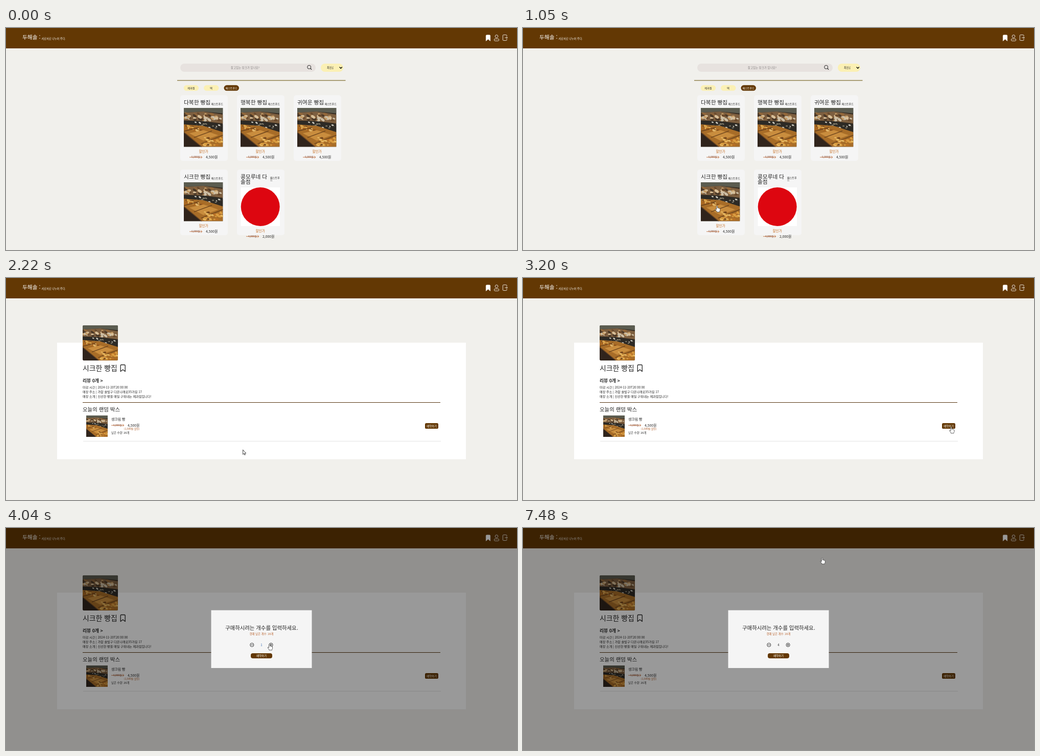
These frames come from a looping animation (1000x436 px, 8000 ms). An HTML page:

```html
<!DOCTYPE html>
<html lang="ko">
<head>
<meta charset="utf-8">
<title>빵집 예약</title>
<style>
  html, body { margin: 0; width: 100%; height: 100%; overflow: hidden; background: #f1f0ec; }
  svg { display: block; width: 100%; height: 100%; }
  text { font-family: "Noto Sans CJK KR", "Noto Sans CJK", "Noto Sans", sans-serif; }
</style>
</head>
<body>
<svg id="stage" viewBox="0 0 1000 436" xmlns="http://www.w3.org/2000/svg"></svg>
<script>
const LOOP = 8000;
const BROWN = '#633804', INK = '#242424', CREAM = '#fbf0b4', RUST = '#b9602a';

// y is the vertical middle of the line
const text = (x, y, size, str, { fill = INK, weight = 400, anchor = 'start', more = '' } = {}) =>
  `<text x="${x}" y="${y + size * 0.37}" font-size="${size}" fill="${fill}" font-weight="${weight}" text-anchor="${anchor}" ${more}>${str}</text>`;
const mid = (x, y, size, str, opts = {}) => text(x, y, size, str, { ...opts, anchor: 'middle' });
const rect = (x, y, w, h, fill, r = 0, more = '') =>
  `<rect x="${x}" y="${y}" width="${w}" height="${h}" rx="${r}" fill="${fill}" ${more}/>`;
const line = (x1, x2, y, color, width) =>
  `<path d="M${x1} ${y}H${x2}" stroke="${color}" stroke-width="${width}"/>`;
const stroke = (d, color, width, more = '') =>
  `<path d="${d}" fill="none" stroke="${color}" stroke-width="${width}" stroke-linecap="round" stroke-linejoin="round" ${more}/>`;
const photo = (x, y, size) =>
  `<use href="#photo" x="${x}" y="${y}" width="${size}" height="${size}"/>`;
const button = (x, y, w, h, label, r = 2.6) =>
  rect(x, y, w, h, BROWN, r) + mid(x + w / 2, y + h / 2, 5.5, label, { fill: '#fff', weight: 500 });

function seeded(seed) {
  return () => (seed = (seed * 16807) % 2147483647) / 2147483647;
}

function loaves(count, seed, x, y, w, h, size, colors, slope = 0) {
  const rnd = seeded(seed);
  let out = '';
  for (let i = 0; i < count; i++) {
    const across = rnd() * w, cx = x + across, cy = y + rnd() * h + across * slope;
    const r = size * (0.7 + rnd() * 0.6);
    const fill = colors[Math.floor(rnd() * colors.length)];
    out += `<ellipse cx="${cx}" cy="${cy}" rx="${r}" ry="${r * 0.55}" fill="${fill}" transform="rotate(${rnd() * 50 - 10} ${cx} ${cy})"/>`;
  }
  return out;
}

function photoSymbol() {
  return `<symbol id="photo" viewBox="0 0 100 100">
    ${rect(0, 0, 100, 100, '#33291f')}
    <path d="M0 0H100V14L50 9L0 12Z" fill="#5b5c50"/>
    <path d="M0 12L50 9L100 17V40L50 34L0 32Z" fill="#7d5f40"/>
    ${loaves(44, 77, 1, 12, 97, 17, 5, ['#c39a64', '#d8bf98', '#94683a', '#cdbfa6', '#6b4a2c', '#4a3827'], 0.06)}
    <path d="M0 33L50 34L100 42V62L50 46L0 42Z" fill="#2d2a25"/>
    ${loaves(16, 31, 30, 36, 68, 11, 3, ['#cfccc0', '#7d7868', '#454038'], 0.12)}
    <path d="M0 42L50 46L100 62V100H46L0 62Z" fill="#a86d28"/>
    ${loaves(26, 53, 3, 45, 50, 12, 4.5, ['#d9a24a', '#a9651f', '#e0b468', '#7b4a1c'], 0.15)}
    <path d="M14 65L50 57L88 70L50 84Z" fill="#c98d3e"/>
    <path d="M0 60L38 50M26 76L72 59M44 92L100 70" stroke="#6b431c" stroke-width="2"/>
    ${loaves(34, 91, 53, 76, 45, 20, 4, ['#d99c40', '#b97026', '#e6b862', '#74461c'])}
    <path d="M0 62L46 100H0Z" fill="#30241c"/>
    <path d="M0 62L46 100" stroke="#6d4724" stroke-width="2"/>
  </symbol>`;
}

const oldPrice = (x, y, label) =>
  text(x + 4, y, 4.9, label, { fill: '#7d4632' }) +
  line(x, x + 25, y + 0.3, RUST, 0.8) +
  stroke(`M${x + 22.5} ${y - 1.8}l2.3 2.1l-2.3 2.1`, RUST, 0.8);

const bookmark = (x, y, w, h, fill, color, width) =>
  `<path d="M${x + 1.5} ${y}H${x + w - 1.5}Q${x + w} ${y} ${x + w} ${y + 1.5}V${y + h}L${x + w / 2} ${y + h - 3.6}L${x} ${y + h}V${y + 1.5}Q${x} ${y} ${x + 1.5} ${y}Z" fill="${fill}" stroke="${color}" stroke-width="${width}" stroke-linejoin="round"/>`;

function header() {
  return rect(0, 0, 1000, 40, BROWN) +
    text(32, 18.5, 10.7, '두해솔 :', { fill: '#fff' }) +
    text(69.5, 20.8, 5.2, '서로서로 나누어 주다.', { fill: '#fff' }) +
    bookmark(939.3, 13.7, 8.4, 11.8, '#fff', '#fff', 0.6) +
    `<circle cx="960" cy="16.4" r="2.8" fill="none" stroke="#fff" stroke-width=".85"/>` +
    rect(955.3, 21.3, 9.4, 4, 'none', 2, 'stroke="#fff" stroke-width=".85"') +
    stroke('M980 16V14.8Q980 13.5 978.7 13.5H973.6Q972.3 13.5 972.3 14.8V23.2Q972.3 24.5 973.6 24.5H978.7Q980 24.5 980 23.2V22M976.5 19H981M979.6 17.4L981.2 19L979.6 20.6', '#fff', 0.85);
}

function card(x, y, name, price) {
  const cx = x + 45.5;
  return rect(x, y, 93, 129, '#f5f5f5', 5) +
    text(x + 7, y + 14, 10.7, name) +
    text(x + 60.5, y + 17, 5.1, '패스트푸드') +
    photo(x + 7, y + 25, 76.5) +
    mid(cx, y + 111, 6.6, '할인가', { fill: '#c56a1c' }) +
    oldPrice(x + 18, y + 121.5, price) +
    text(x + 50, y + 121.5, 6.8, '4,500원');
}

function burgerCard(x, y) {
  return rect(x, y, 93, 129, '#f5f5f5', 5) +
    text(x + 7, y + 14, 10.7, '콩모루네 다') + text(x + 7, y + 24.2, 10.7, '솔점') +
    text(x + 65, y + 16.5, 5.1, '패스트푸') + text(x + 65, y + 20.5, 5.1, '드') +
    rect(x + 7.5, y + 35, 76.5, 76, '#fff') +
    `<circle cx="${x + 45.7}" cy="${y + 73}" r="38" fill="#dd0610"/>` +
    mid(x + 45.5, y + 121, 6.6, '할인가', { fill: '#c56a1c' }) +
    oldPrice(x + 18, y + 131, '4,000원') +
    text(x + 50, y + 131, 6.8, '2,000원');
}

const tag = (x, label, on) =>
  rect(x, 112.3, 29.5, 11, on ? BROWN : CREAM, 5.5) +
  mid(x + 14.7, 118, 5.1, label, { fill: on ? '#fff' : INK, weight: on ? 500 : 400 });

function homePage() {
  return rect(341, 70, 265, 16, '#e7e2df', 8) +
    mid(468, 78, 5.5, '찾고있는 링크가 있나요?', { fill: '#858080' }) +
    `<circle cx="593.2" cy="76.8" r="3.5" fill="none" stroke="${INK}"/>` +
    stroke('M595.8 79.4L597.8 81.5', INK, 1.1) +
    rect(616, 70, 44, 16, CREAM, 8) +
    text(628, 78, 5.4, '최신순', { more: 'clip-path="url(#select)"' }) +
    stroke('M653 77L655.2 79.2L657.4 77', '#000', 1.4) +
    line(335, 664.5, 103, '#938550', 1.6) +
    tag(347.7, '제과점') + tag(387, '떡') + tag(426.5, '패스트푸드', true) +
    card(341, 132, '다복한 빵집', '5,000원') +
    card(452, 132, '행복한 빵집', '5,000원') +
    card(563, 132, '귀여운 빵집', '5,000원') +
    card(341, 278, '시크한 빵집', '6,000원') +
    burgerCard(452, 278);
}

const brokenImage = (x, y, label) =>
  rect(x, y, 4.6, 5, '#dce8ee', 0, 'stroke="#8b969c" stroke-width=".6"') +
  `<path d="M${x} ${y + 5}l2-2.4l2.6 2.4z" fill="#5d9c56"/>` +
  text(x + 5.2, y + 2.6, 5.4, label);

function shop(reviews, info, panelHeight, itemLine) {
  return rect(100, 127, 800, panelHeight, '#fff') +
    text(150, 201.5, 8.8, `리뷰 ${reviews}개 &gt;`, { weight: 700 }) +
    ['마감 시간', '매장 주소', '매장 소개']
      .map((label, i) => text(150, 214.8 + i * 9, 6.15, `${label} | ${info[i] || ''}`)).join('') +
    line(150, 850, 244.5, '#55340e', 1.2) +
    text(150, 258, 10.45, '오늘의 랜덤 박스') +
    line(151, 851, itemLine, '#e4e4e4', 1);
}

function loadingPage() {
  return shop('', [], 226, 317.5) +
    brokenImage(150.3, 92.5, '가게 사진') +
    bookmark(206.5, 170.5, 9, 13, 'none', INK, 1.3) +
    brokenImage(157, 270, '상품 이미지') +
    text(197, 282, 7, '가격 정보가 없습니') + text(197, 289.5, 7, '다원') +
    text(199, 285.3, 5, '가격 정보가 없습니다원', { fill: '#7d4632' }) +
    line(197, 249, 285.5, RUST, 0.7) +
    mid(238, 296, 4.9, '(NaN원 할인)', { fill: '#c0502a', weight: 500 }) +
    text(197, 304, 5.4, '남은 수량: 개') +
    button(813, 285, 26, 11, '예약하기');
}

function detailPage() {
  const info = ['2024-11-20T20:00:00', '가람 솔빛구 다온나래로35가길 17', '신선한 빵을 매일 구워내는 제과점입니다!'];
  return shop(0, info, 229, 320.5) +
    `<g clip-path="url(#round)">${photo(150, 92.7, 69.2)}</g>` +
    text(150, 177, 13.9, '시크한 빵집') +
    bookmark(224.2, 170.5, 9, 13, 'none', INK, 1.3) +
    photo(157, 270, 42) +
    text(206, 277, 6.9, '생크림 빵') +
    oldPrice(206, 289, '6,000원') +
    text(238, 289, 6.8, '4,500원') +
    text(231, 296, 4.9, '(1,500원 할인)', { fill: '#a9541f', weight: 500 }) +
    text(206, 304, 5.4, '남은 수량: 20개') +
    button(820, 285, 26, 11, '예약하기');
}

const roundSign = (x, d) =>
  `<circle cx="${x}" cy="229.6" r="3.6" fill="none" stroke="${INK}" stroke-width=".9"/>` + stroke(d, INK, 0.9);

function dialog() {
  return rect(0, 0, 1000, 436, '#000', 0, 'opacity=".4"') +
    rect(401.5, 161.5, 197, 113.5, '#f5f5f5') +
    mid(500.3, 196.5, 10.4, '구매하시려는 개수를 입력하세요.') +
    mid(500, 207.7, 5.4, '현재 남은 개수: 20개', { fill: RUST }) +
    roundSign(481.3, 'M479.6 229.6h3.4') +
    roundSign(518.6, 'M516.9 229.6h3.4M518.6 227.9v3.4') +
    mid(500, 229.6, 6, '1', { more: 'id="count"' }) +
    button(479, 246, 42, 10, '예약하기', 4);
}

const cursors = `
  <g id="cursor">
    <path id="arrow" d="M0 0V9L2 7.2L3.4 10.2L4.7 9.6L3.4 6.7H6Z" fill="#fff" stroke="#111" stroke-width=".8" stroke-linejoin="round"/>
    <path id="hand" d="M-1 1Q0 -.5 1 1V4.5Q2 3.8 2.8 4.9Q3.8 4.3 4.5 5.4Q6 5 6 6.7V8.6Q6 10.2 5 11.2V12.4H-.6V11.4L-3.3 7.7Q-3.5 6.2 -2.2 6.6L-1 7.8Z" fill="#fff" stroke="#333" stroke-width=".75" stroke-linejoin="round"/>
  </g>`;

const stage = document.getElementById('stage');
stage.innerHTML = `<defs>${photoSymbol()}
    <clipPath id="select">${rect(620, 70, 20.5, 16, '#000')}</clipPath>
    <clipPath id="round">${rect(150, 92.7, 69.2, 69.2, '#000', 3)}</clipPath>
  </defs>
  ${rect(0, 0, 1000, 436, '#f1f0ec')}${header()}
  <g id="home">${homePage()}</g>
  <g id="loading">${loadingPage()}</g>
  <g id="detail">${detailPage()}</g>
  <g id="dialog">${dialog()}</g>${cursors}`;

// pointer moves: start, end, number of visible steps, from, to
const moves = [
  [190, 390, 4, [745, 398], [700, 330]],
  [620, 1050, 7, [678.7, 314.3], [379.7, 349]],
  [1990, 2780, 16, [384, 347], [838, 292.5]],
  [3470, 4040, 8, [826, 290], [515.5, 227.5]],
  [4580, 4580, 1, [517.5, 228], [517.5, 228]],
  [6080, 6330, 10, [517, 230], [507, 249]],
  [7300, 7480, 6, [511, 237], [585.3, 58.3]]
];
const countTimes = [4580, 4910, 5780];

function pointerAt(t) {
  const move = moves.filter(m => t >= m[0]).pop();
  if (!move) return null;
  const [start, end, steps, from, to] = move;
  let p = 1;
  if (t < end) p = Math.floor((t - start) / (end - start) * (steps - 1)) / (steps - 1);
  p = p * p * (3 - 2 * p);
  return from.map((v, i) => v + (to[i] - v) * p);
}

const within = ([x, y], left, top, w, h) => x >= left && x <= left + w && y >= top && y <= top + h;

function isHand(t, pos) {
  if (t < 1560) return within(pos, 341, 278, 93, 129) || within(pos, 452, 278, 93, 129);
  if (t < 3270) return t < 1990 || within(pos, 820, 285, 26, 11);
  return true;
}

const el = id => document.getElementById(id);
const show = (id, on) => el(id).setAttribute('display', on ? 'inline' : 'none');

function draw(t) {
  show('home', t < 1560);
  show('loading', t >= 1560 && t < 1760);
  show('detail', t >= 1760);
  show('dialog', t >= 3270);
  const count = 1 + countTimes.filter(c => t >= c).length;
  el('count').textContent = count;
  el('count').setAttribute('fill', count === 1 ? '#3468b0' : INK);

  const pos = pointerAt(t);
  show('cursor', pos);
  if (!pos) return;
  const hand = isHand(t, pos);
  el('cursor').setAttribute('transform', `translate(${pos})`);
  show('hand', hand);
  show('arrow', !hand);
}

const began = performance.now();
function tick() {
  draw((performance.now() - began) % LOOP);
  requestAnimationFrame(tick);
}
tick();
</script>
</body>
</html>
```
